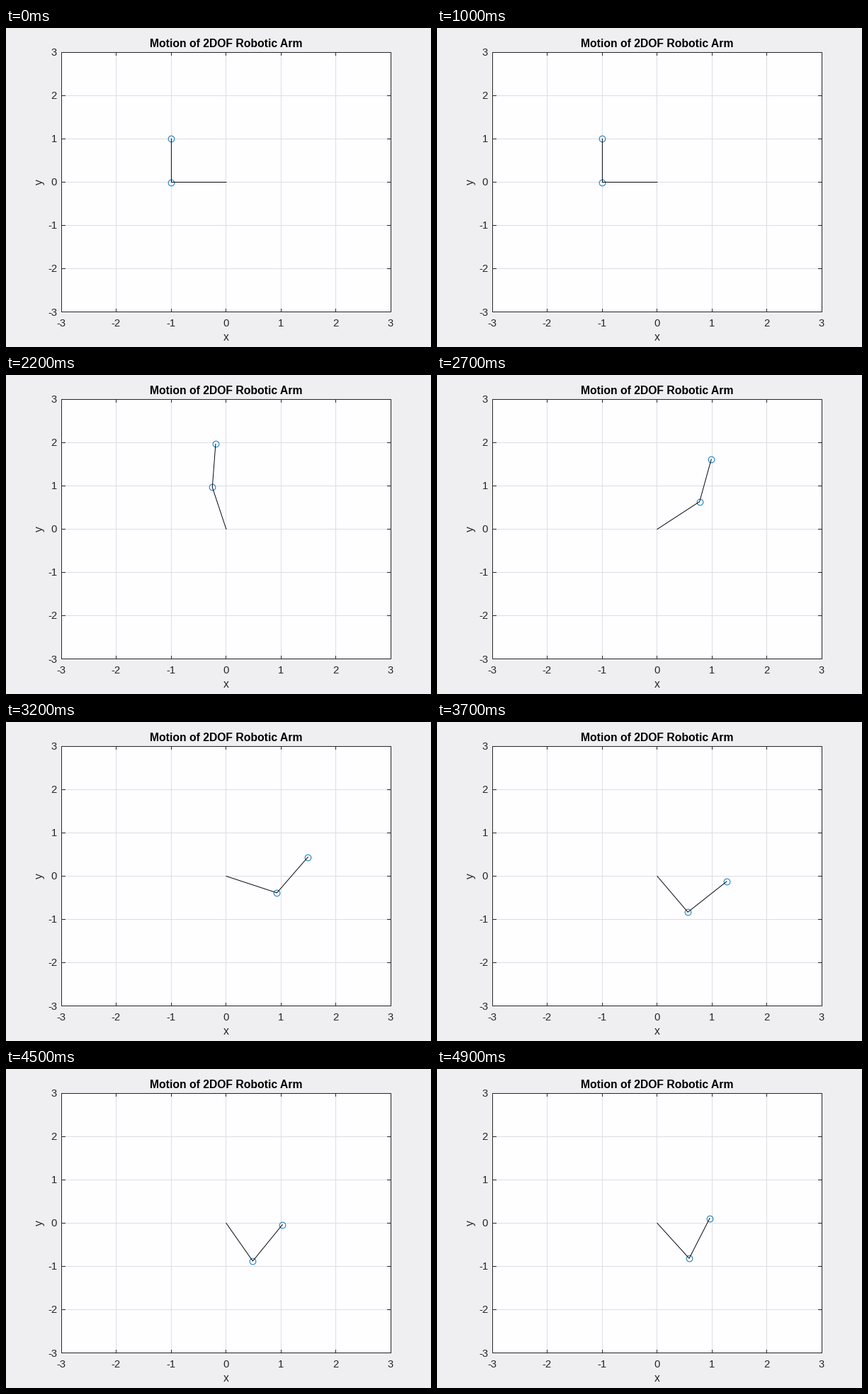
Recreate the animation shown at these times as a matplotlib script. Size 600 by 450 pixels, loop 5000 ms.

```python
import numpy as np
import matplotlib.pyplot as plt
from matplotlib.animation import FuncAnimation

W, H, DPI = 600, 450, 100
FRAMES, HOLD = 50, 10
INK = "#262626"
plt.rcParams["font.family"] = "Liberation Sans"

# Absolute link angles in degrees at key steps
STEPS = [0, 2, 5, 8, 11, 17, 23, 27, 31, 35, 39]
LINK1 = [180, 179.6, 174.8, 155, 117.5, 39.5, -32, -56.1, -63.8, -61.1, -54.4]
LINK2 = [90, 90.5, 91.3, 89, 87.5, 77.7, 52.2, 45, 49.3, 57.3, 68]


def px(x):
    return 310.4 + 77.5 * x


def py(y):
    return 217 - 61.1 * y


def pt(size):
    """Pixels to points."""
    return size * 72 / DPI


def hermite(t, ts, vs):
    """Smooth curve through the key values."""
    ts, vs = np.array(ts, float), np.array(vs, float)
    slopes = np.gradient(vs, ts)
    slopes[0] = 0
    i = min(np.searchsorted(ts, t, side="right") - 1, len(ts) - 2)
    h = ts[i + 1] - ts[i]
    s = (t - ts[i]) / h
    return ((2 * s**3 - 3 * s**2 + 1) * vs[i]
            + (s**3 - 2 * s**2 + s) * h * slopes[i]
            + (3 * s**2 - 2 * s**3) * vs[i + 1]
            + (s**3 - s**2) * h * slopes[i + 1])


def pose(step):
    """Pixel centres of base, elbow and hand."""
    a = np.radians(hermite(step, STEPS, LINK1))
    b = np.radians(hermite(step, STEPS, LINK2))
    x = np.cumsum([0, np.cos(a), np.cos(b)])
    y = np.cumsum([0, np.sin(a), np.sin(b)])
    return px(x) + 0.5, py(y) + 0.5


fig = plt.figure(figsize=(W / DPI, H / DPI), dpi=DPI, facecolor="#efeef0")
ax = fig.add_axes([0, 0, 1, 1])
ax.set_xlim(0, W)
ax.set_ylim(H, 0)
ax.axis("off")

left, right, top, bottom = px(-3), px(3), py(3), py(-3)
ax.fill([left, right, right, left], [top, top, bottom, bottom],
        color="#fefdff", lw=0, zorder=0)


def line(xs, ys, color=INK, z=2):
    ax.plot(xs, ys, color=color, lw=pt(1), zorder=z)


def label(x, y, text, size, **kw):
    ax.text(x, y, text, fontsize=pt(size), va="baseline",
            **{"color": INK, "ha": "center", **kw})


TICK = 4.7
for v in range(-3, 4):
    x, y = px(v), py(v)
    if abs(v) < 3:
        line([x, x], [top, bottom], "#dedee0", 1)
        line([left, right], [y, y], "#dedee0", 1)
        for edge, d in ((top, TICK), (bottom, -TICK)):
            line([x, x], [edge, edge + d])
        for edge, d in ((left, TICK), (right, -TICK)):
            line([edge, edge + d], [y, y])
    label(x, 421, str(v), 14.8)
    label(72, y + 5.3, str(v), 14.8, ha="right")
line([left, right, right, left, left], [top, top, bottom, bottom, top])

label(310.8, 27.2, "Motion of 2DOF Robotic Arm", 15.7,
      weight="bold", color="black")
label(310.4, 441.4, "x", 15.7)
label(52, 217.5, "y", 15.7, rotation=90, rotation_mode="anchor")

arm, = ax.plot([], [], color="black", lw=pt(0.95), zorder=4)
joints, = ax.plot([], [], "o", ms=pt(8.7), mfc="none", mec="#0072bd",
                  mew=pt(0.95), zorder=3)
arm.set_snap(False)
joints.set_snap(False)


def draw(frame):
    x, y = pose(max(0, frame - HOLD))
    arm.set_data(x, y)
    joints.set_data(x[1:], y[1:])
    return arm, joints


anim = FuncAnimation(fig, draw, frames=FRAMES, interval=100,
                     repeat=True, repeat_delay=0)
plt.show()
```
